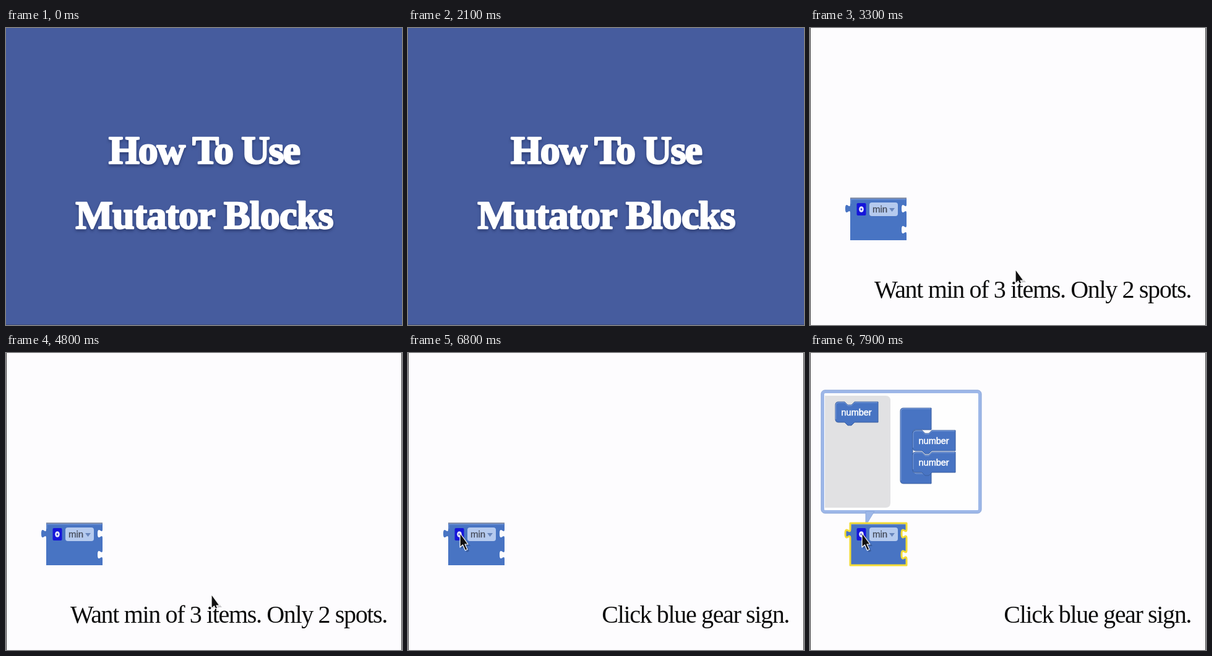
Animation, 640 px wide and 480 px high, one loop 8000 ms. Source, as an HTML page without scripts:

```html
<!DOCTYPE html>
<html lang="en">
<head>
<meta charset="utf-8">
<title>Mutator blocks</title>
<style>
  html, body { margin: 0; width: 100%; height: 100%; overflow: hidden; background: #fdfcfe; }
  svg { display: block; width: 100vw; height: 100vh; }

  .title, .note, .open { animation: 8s step-end infinite; }
  .title { animation-name: title; }
  .want { animation-name: want; }
  .click { animation-name: click; }
  .open { animation-name: open; }
  .cursor { animation: move 8s ease-in-out infinite; }

  .title text {
    font: bold 64px "Liberation Serif", "Noto Serif", serif;
    fill: #fff; stroke: #fff; stroke-width: 2.6; stroke-linejoin: round;
    text-anchor: middle;
    filter: drop-shadow(0 3px 2px #1c2a5a99);
  }
  .note text {
    font: 40px "Liberation Serif", "Noto Serif", serif;
    letter-spacing: -1.35px; text-anchor: end; fill: #0c0c0c;
  }
  .soft { filter: blur(.5px); }
  .blue { fill: #4874c3; }
  .edge { stroke: #3a5f9f; stroke-width: 1; }
  .label { font: 14.5px "Liberation Sans", Roboto, sans-serif; fill: #fff; stroke: #fff; stroke-width: .5; }
  .min { font: 15px "Liberation Sans", Roboto, sans-serif; fill: #444a58; stroke: #444a58; stroke-width: .3; }

  @keyframes title { 0% { opacity: 1 } 27.45%, 100% { opacity: 0 } }
  @keyframes want { 0% { opacity: 0 } 29.95% { opacity: 1 } 69.95%, 100% { opacity: 0 } }
  @keyframes click { 0% { opacity: 0 } 69.95%, 100% { opacity: 1 } }
  @keyframes open { 0% { opacity: 0 } 93.7%, 100% { opacity: 1 } }
  @keyframes move {
    0%, 27.5% { transform: translate(315px, 385px) }
    33.75%, 67.5% { transform: translate(332px, 390px) }
    72.5%, 76.25% { transform: translate(227px, 400px) }
    83.75%, 100% { transform: translate(84px, 291px) }
  }
</style>
</head>
<body>
<svg viewBox="0 0 640 480" preserveAspectRatio="none">
  <defs>
    <path id="body" d="M65 275H156V285c0 9-8-7-8 7s8-2 8 7V319c0 9-8-7-8 7s8-2 8 7V343H65V299c0-9-8 7-8-7s8 2 8-7Z"/>
    <g id="number">
      <path class="blue edge" d="M5 0H15l5 5h6l5-5H69V33H31l-5 5h-6l-5-5H5q-5 0-5-5V5Q0 0 5 0Z"/>
      <path d="M.8 28V5Q1 1 5 1H15l5 5h6l5-5H68" fill="none" stroke="#7fa0dc"/>
      <text class="label" x="9.5" y="22">number</text>
    </g>
  </defs>

  <rect width="640" height="480" fill="#fdfcfe"/>

  <g class="open">
    <g class="soft">
      <rect x="20.5" y="62.5" width="254" height="194" rx="4" fill="#fefefe" stroke="#9db7e8" stroke-width="5"/>
      <rect x="18" y="60" width="259" height="199" rx="6" fill="none" stroke="#86a2d8"/>
      <path d="M24 69H122q8 0 8 8V242q0 8-8 8H24Z" fill="#e1e1e3"/>
      <path d="M90 256H104L90 279Z" fill="#9db7e8" stroke="#86a2d8" stroke-width=".8"/>
      <use href="#number" x="41" y="79"/>
      <path class="blue edge" d="M151 89H196V124H171q-5 0-5 5V189q0 5 5 5H196V211H151q-5 0-5-5V94q0-5 5-5Z"/>
      <path d="M147 206V94q0-4 4-4H195M168 192q1 3 4 3H195" fill="none" stroke="#7fa0dc"/>
      <use href="#number" x="166" y="160"/>
      <use href="#number" x="166" y="125"/>
    </g>
  </g>

  <g class="soft">
    <use href="#body" class="blue"/>
    <path d="M65 275H156" stroke="#8590a8" stroke-width="2"/>
    <path d="M66 284V277H155" fill="none" stroke="#789bd8"/>
    <use href="#body" class="open" fill="none" stroke="#f3dc35" stroke-width="3" stroke-linejoin="round"/>
    <rect x="75.5" y="283" width="15" height="20" rx="2" fill="#1515da"/>
    <ellipse cx="83" cy="293" rx="3.8" ry="4.8" fill="#e4e8fb"/>
    <ellipse cx="83" cy="293" rx="1.3" ry="1.8" fill="#3535d0"/>
    <rect x="96" y="282" width="46" height="22" rx="4" fill="#b5caee"/>
    <text class="min" x="101" y="298">min</text>
    <path d="M128 291h9l-4.500 6Z" fill="#6986bd"/>
  </g>

  <g class="cursor">
    <path d="M2 3V26l5-4 4 9 4-2-4-8h6Z" fill="#0003" class="soft"/>
    <path d="M0 0V23l4.500-4 4 9 3.500-1.500-4-8.500H13Z" fill="#111" stroke="#fff" stroke-width="1.2" stroke-linejoin="round"/>
  </g>

  <g class="note want">
    <rect x="98" y="412" width="522" height="32" fill="#fdfcfe"/>
    <text x="616" y="436">Want min of 3 items. Only 2 spots.</text>
  </g>
  <g class="note click">
    <text x="616" y="436">Click blue gear sign.</text>
  </g>

  <path d="M.5 0V480M639.500 0V480" stroke="#3c3c3e"/>

  <g class="title">
    <rect width="640" height="480" fill="#465c9e"/>
    <path d="M0 479.500H640" stroke="#3b4a78"/>
    <text x="320" y="219" letter-spacing="-1.9">How To Use</text>
    <text x="320.500" y="324" letter-spacing="-.8">Mutator Blocks</text>
  </g>
</svg>
</body>
</html>
```
